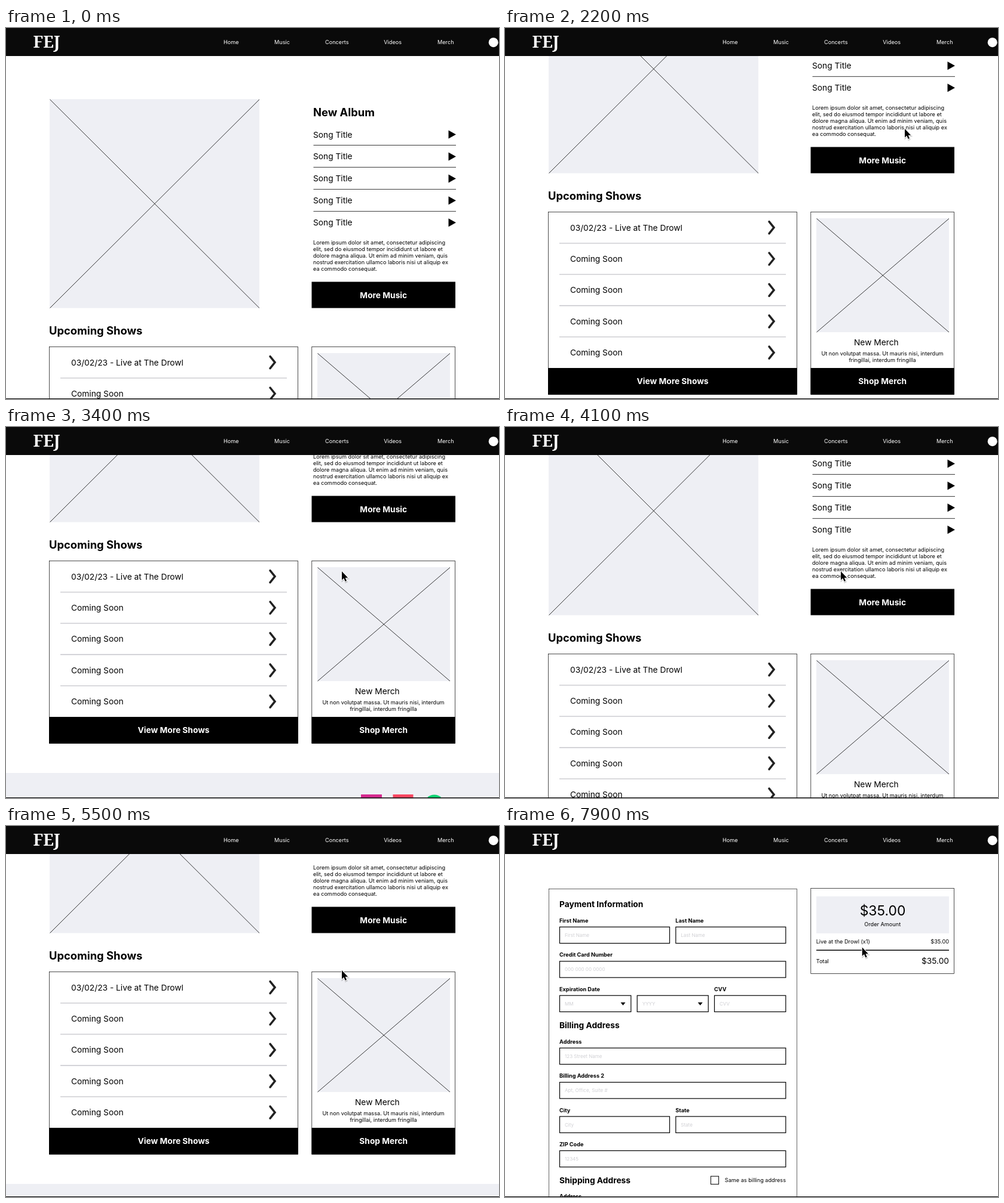
Animation, 825 px wide and 622 px high, one loop 8000 ms. Source, as an HTML page:

```html
<!DOCTYPE html>
<html lang="en">
<head>
<meta charset="utf-8">
<title>Band site prototype</title>
<style>
  html, body { margin: 0; width: 100%; height: 100%; overflow: hidden; background: #fff; }
  svg { display: block; width: 100vw; height: 100vh; font-family: Inter, sans-serif; }
</style>
</head>
<body>
<svg id="stage" viewBox="0 0 825 622"></svg>
<script>
const LOOP = 8000, STEP = 100;
const GREY = '#eeeff4', HINT = '#d0d0d4';
const S = 8.02, M = 9.17, L = 13.75, XL = 18.33, XXL = 22.92;

const tag = (name, attrs, body = '') =>
  `<${name} ${Object.entries(attrs).map(([k, v]) => `${k}="${v}"`).join(' ')}>${body}</${name}>`;
const rect = (x, y, width, height, fill, more) => tag('rect', { x, y, width, height, fill, ...more });
const frame = (x, y, w, h, weight = .7) => rect(x, y, w, h, 'none', { stroke: '#000', 'stroke-width': weight });
const path = (d, fill = '#000', more) => tag('path', { d, fill, ...more });
const line = (d, color, weight) => path(d, 'none', { stroke: color, 'stroke-width': weight });
const text = (s, x, y, size, more) => tag('text', { x, y, 'font-size': size, ...more }, s);
const bold = (s, x, y, size, more) => text(s, x, y, size, { 'font-weight': 700, ...more });
const mid = { 'text-anchor': 'middle' }, end = { 'text-anchor': 'end' };
const range = (n, f) => Array.from({ length: n }, (_, i) => f(i)).join('');
const lines = (list, x, y, more) => list.map((s, i) => text(s, x, y + i * 11.05, M, more)).join('');

const imageBox = (x, y, w, h) => rect(x, y, w, h, GREY) +
  line(`M${x + .5} ${y + .5}L${x + w} ${y + h}M${x + w} ${y + .5}L${x + .5} ${y + h}`, '#111', .85);
const button = (s, x, y, w, h) => rect(x, y, w, h, '#000') +
  bold(s, x + w / 2, y + h / 2 + 5, L, { fill: '#fff', ...mid });

function songs() {
  return bold('New Album', 514, 148.4, XL) +
    range(5, i => {
      const y = 178.5 + i * 36.95;
      return text('Song Title', 514, y + 5, L) + path(`M740.5 ${y - 7}L753 ${y}L740.5 ${y + 7}Z`);
    }) +
    range(4, i => line(`M514.5 ${196.5 + i * 36.95}H753`, '#222', .9)) +
    lines(['Lorem ipsum dolor sit amet, consectetur adipiscing',
      'elit, sed do eiusmod tempor incididunt ut labore et',
      'dolore magna aliqua. Ut enim ad minim veniam, quis',
      'nostrud exercitation ullamco laboris nisi ut aliquip ex',
      'ea commodo consequat.'], 514, 362.8) +
    button('More Music', 511.5, 425.5, 240.5, 44);
}

function shows() {
  return bold('Upcoming Shows', 72, 513.8, XL) + frame(72.5, 534.5, 416, 306) +
    range(5, i => {
      const y = 560.6 + i * 52.4;
      return text(i ? 'Coming Soon' : '03/02/23 - Live at The Drowl', 109, y + 5, L) +
        path(`M442 ${y - 10}L450 ${y}L442 ${y + 10}`, 'none',
          { stroke: '#222', 'stroke-width': 3.5, 'stroke-linecap': 'round' });
    }) +
    range(4, i => line(`M91 ${586.8 + i * 52.35}H470`, '#c4c4ca', 1.3)) +
    button('View More Shows', 72, 796, 417, 44.5);
}

function merch() {
  return frame(511.8, 534.5, 239.7, 306) + imageBox(521, 545, 222, 191) +
    text('New Merch', 584, 758, L) +
    lines(['Ut non volutpat massa. Ut mauris nisi, interdum', 'fringillai, interdum fringilla'], 631.5, 774.8, mid) +
    button('Shop Merch', 511.5, 796, 240.5, 44.5);
}

function footer() {
  const note = ['Ut non volutpat massa. Ut', 'mauris nisi, interdum fringilla'];
  return rect(0, 890, 825, 104, GREY) + lines(note, 174.5, 941, mid) + lines(note, 452, 941, mid) +
    rect(594, 926, 35, 35, '#d62a8f') + rect(647.5, 926, 34, 34.5, '#fb4761') +
    tag('circle', { cx: 716.7, cy: 943.5, r: 17, fill: '#0fd473' }) +
    rect(758, 932, 22, 22, '#ff0a33');
}

const field = (label, hint, x, y, w) =>
  bold(label, x, y - 7.4, M) + frame(x + .5, y, w - 1, 27.3, 1.2) + text(hint, x + 9, y + 16.6, S, { fill: HINT });
const caret = (x, y) => path(`M${x - 4} ${y - 2.3}H${x + 4}L${x} ${y + 2.7}Z`);

function payment() {
  return frame(73.3, 105.4, 415.2, 600, .6) +
    bold('Payment Information', 91, 136.3, L) +
    field('First Name', 'First Name', 91, 169.3, 185) + field('Last Name', 'Last Name', 285.3, 169.3, 185) +
    field('Credit Card Number', '000 000 00 0000', 91, 226.8, 379.3) +
    field('Expiration Date', 'MM', 91, 284.2, 120.3) + field('', 'YYYY', 220.7, 284.2, 120) +
    field('CVV', 'CVV', 350, 284.2, 120.3) + caret(197.5, 298) + caret(326.7, 298) +
    bold('Billing Address', 91, 339, L) +
    field('Address', '123 Street Name', 91, 372.2, 379.3) +
    field('Billing Address 2', 'Apt, Office, Suite #', 91, 429.6, 379.3) +
    field('City', 'City', 91, 487, 185) + field('State', 'State', 285.3, 487, 185) +
    field('ZIP Code', '12345', 91, 544.4, 379.3) +
    bold('Shipping Address', 91, 599, L) + frame(344.4, 587.2, 13.2, 13.4, 1) +
    text('Same as billing address', 470, 596.8, M, end) +
    field('Address', '123 Street Name', 91, 631.6, 379.3) +
    frame(511.8, 104.5, 239.7, 143, .7) + rect(521, 118, 222, 62, GREY) +
    text('$35.00', 632, 149.8, XXL, mid) + text('Order Amount', 631.7, 168, M, mid) +
    text('Live at the Drowl (x1)', 520.7, 197.3, M) + text('$35.00', 743, 197.3, M, end) +
    line('M521 208.2H743', '#000', 1.5) +
    text('Total', 520.7, 229.5, M) + text('$35.00', 743, 231.1, L, end);
}

function header() {
  const nav = { Home: 364, Music: 449, Concerts: 534, Videos: 632.3, Merch: 722 };
  return rect(0, 0, 825, 47, '#0a0a0a') +
    text('FEJ', 68, 33, 27, { fill: '#fff', 'font-family': 'Noto Serif, serif', 'font-weight': 900, ...mid }) +
    Object.entries(nav).map(([s, x]) => text(s, x, 26.7, M, { fill: '#fff' })).join('') +
    tag('circle', { cx: 815.7, cy: 24.2, r: 8, fill: '#fff' });
}

const arrow = 'M0 0V14.6L3.3 11.5L5.7 17L8 16L5.7 10.7H10.2Z';
const stage = document.getElementById('stage');
stage.innerHTML =
  tag('g', { id: 'home' }, imageBox(73, 119.3, 351, 350.2) + songs() + shows() + merch() + footer()) +
  tag('g', { id: 'pay' }, payment()) + header() + rect(0, 621, 825, 1, '#000') +
  tag('g', { id: 'cursor' },
    path(arrow, '#000', { opacity: .2, transform: 'translate(.6 1.6)', stroke: '#000', 'stroke-width': 2 }) +
    path(arrow, '#000', { stroke: '#fff', 'stroke-width': 2, 'paint-order': 'stroke', 'stroke-linejoin': 'round' }));
const [home, pay, cursor] = ['home', 'pay', 'cursor'].map(id => document.getElementById(id));

// Monotone cubic through [time, value] keys.
function curve(keys) {
  const rate = i => (keys[i + 1][1] - keys[i][1]) / (keys[i + 1][0] - keys[i][0]);
  const slope = keys.map((_, i) => {
    if (!i || i === keys.length - 1) return 0;
    const a = rate(i - 1), b = rate(i);
    return a * b > 0 ? 2 * a * b / (a + b) : 0;
  });
  return t => {
    if (t <= keys[0][0]) return keys[0][1];
    const j = keys.findIndex(k => k[0] >= t);
    if (j < 0) return keys[keys.length - 1][1];
    const [t0, a] = keys[j - 1], [t1, b] = keys[j], h = t1 - t0, u = (t - t0) / h, v = 1 - u;
    return a * v * v * (1 + 2 * u) + b * u * u * (3 - 2 * u) + h * u * v * (slope[j - 1] * v - slope[j] * u);
  };
}

const scroll = curve([[1000, 0], [1100, 2], [1200, 22], [2200, 226], [2900, 372], [3200, 372], [3400, 310],
  [3900, 200], [4400, 110], [4900, 154], [5500, 290], [6200, 372]]);
const cursorX = curve([[300, 650], [1000, 669], [2800, 669], [3300, 562], [6700, 562], [7300, 446], [7500, 446], [7900, 597.7]]);
const cursorY = curve([[300, 597], [1000, 169], [2800, 169], [3300, 242], [6700, 242], [7300, 188], [7500, 188], [7900, 203.5]]);

function draw(now) {
  const t = Math.floor(now % LOOP / STEP) * STEP;
  const paying = t >= 7600;
  home.style.display = paying ? 'none' : '';
  pay.style.display = paying ? '' : 'none';
  home.setAttribute('transform', `translate(0 ${-Math.round(scroll(t))})`);
  cursor.style.display = t < 100 ? 'none' : '';
  cursor.setAttribute('transform', `translate(${cursorX(t)} ${cursorY(t)})`);
}

const start = performance.now();
function tick() {
  draw(performance.now() - start);
  requestAnimationFrame(tick);
}
tick();
</script>
</body>
</html>
```
